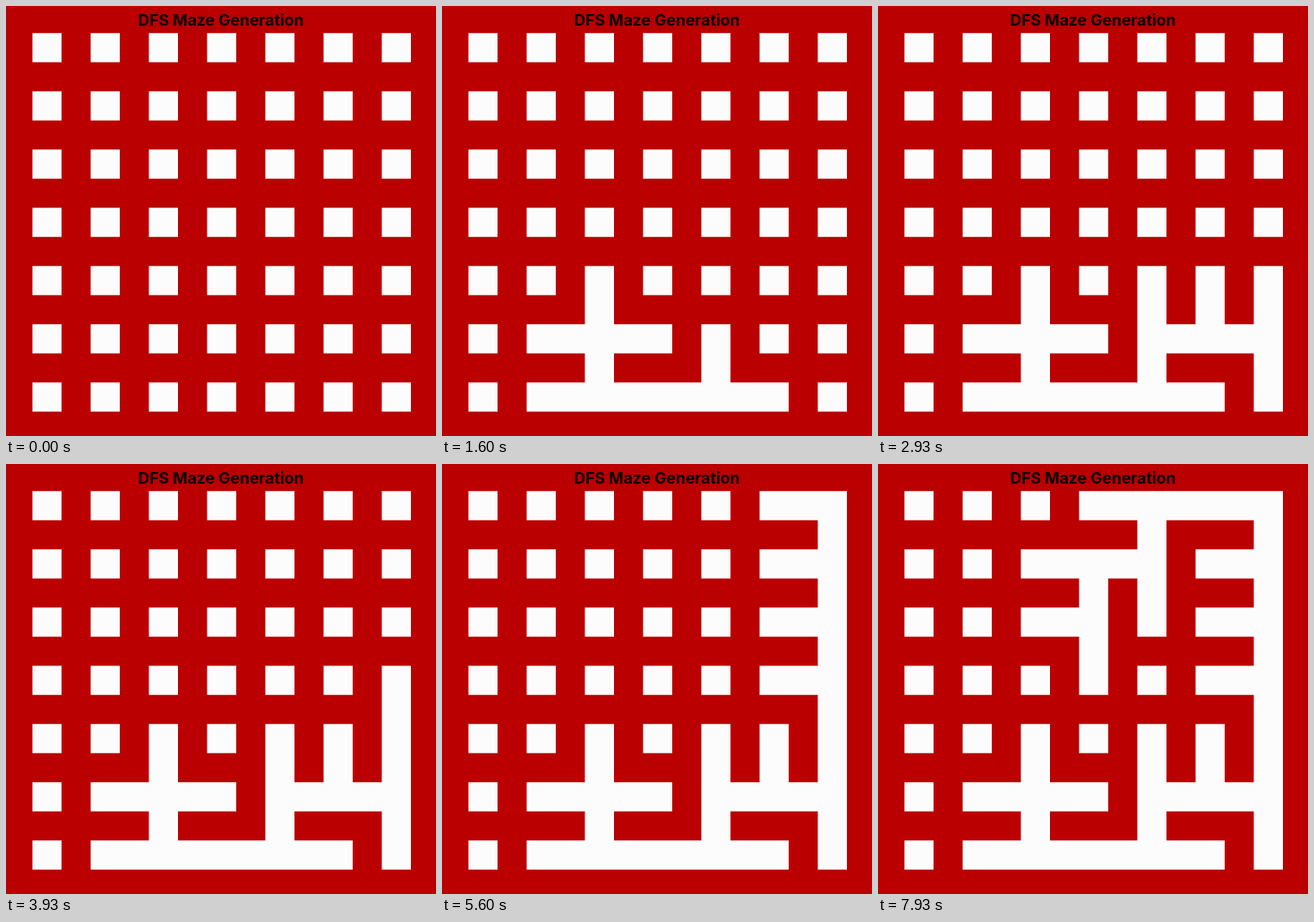
An HTML page for the animation above (8000 ms loop, 480 px wide and 480 px high).

```html
<!DOCTYPE html>
<html lang="en">
<head>
<meta charset="utf-8">
<title>DFS Maze Generation</title>
<style>
  html, body { margin: 0; width: 100%; height: 100%; overflow: hidden; background: #ba0000; }
  svg { display: block; width: 100%; height: 100%; }
  path { fill: none; stroke: #fcfcfc; stroke-width: 32.5; stroke-linecap: square; }
  text { font: 700 17.6px Inter, "Open Sans", sans-serif; text-anchor: middle; fill: #0c0000; }
</style>
</head>
<body>
<svg viewBox="0 0 480 480">
  <path id="maze"/>
  <text x="240" y="21.8">DFS Maze Generation</text>
</svg>
<script>
const LOOP = 8000, STEP = 433, FIRST = 190, SIZE = 7;

// Each visit: column and row of the cell, then the directions it opens.
const visits = [
  '26 LRU', '25 LRU', '36 R', '46 RU', '45 UR', '55 UR', '65 UD', '66',
  '64 U', '63 LU', '62 LU', '61 LU', '60 L', '50 L', '40 DL',
  '41 LD', '31 LD', '32 LD'
];
const directions = { L: [-1, 0], R: [1, 0], U: [0, -1], D: [0, 1] };

const point = (col, row) => `${45.75 + 65 * col} ${46.45 + 65 * row}`;
const passage = (col, row, dx = 0, dy = 0) =>
  `M${point(col, row)}L${point(col + dx, row + dy)}`;

const cells = Array.from({ length: SIZE * SIZE }, (_, i) =>
  passage(i % SIZE, Math.floor(i / SIZE))).join('');

const stages = [cells];
for (const visit of visits) {
  const [cell, moves = ''] = visit.split(' ');
  const opened = [...moves].map(m => passage(+cell[0], +cell[1], ...directions[m]));
  stages.push(stages[stages.length - 1] + opened.join(''));
}

const maze = document.getElementById('maze');
const start = performance.now();
let shown = -1;

function draw(now) {
  const time = Math.max(0, now - start) % LOOP;
  const step = Math.floor((time - FIRST) / STEP) + 1;
  const stage = Math.max(0, Math.min(step, visits.length));
  if (stage !== shown) maze.setAttribute('d', stages[shown = stage]);
  requestAnimationFrame(draw);
}
draw(start);
</script>
</body>
</html>
```
